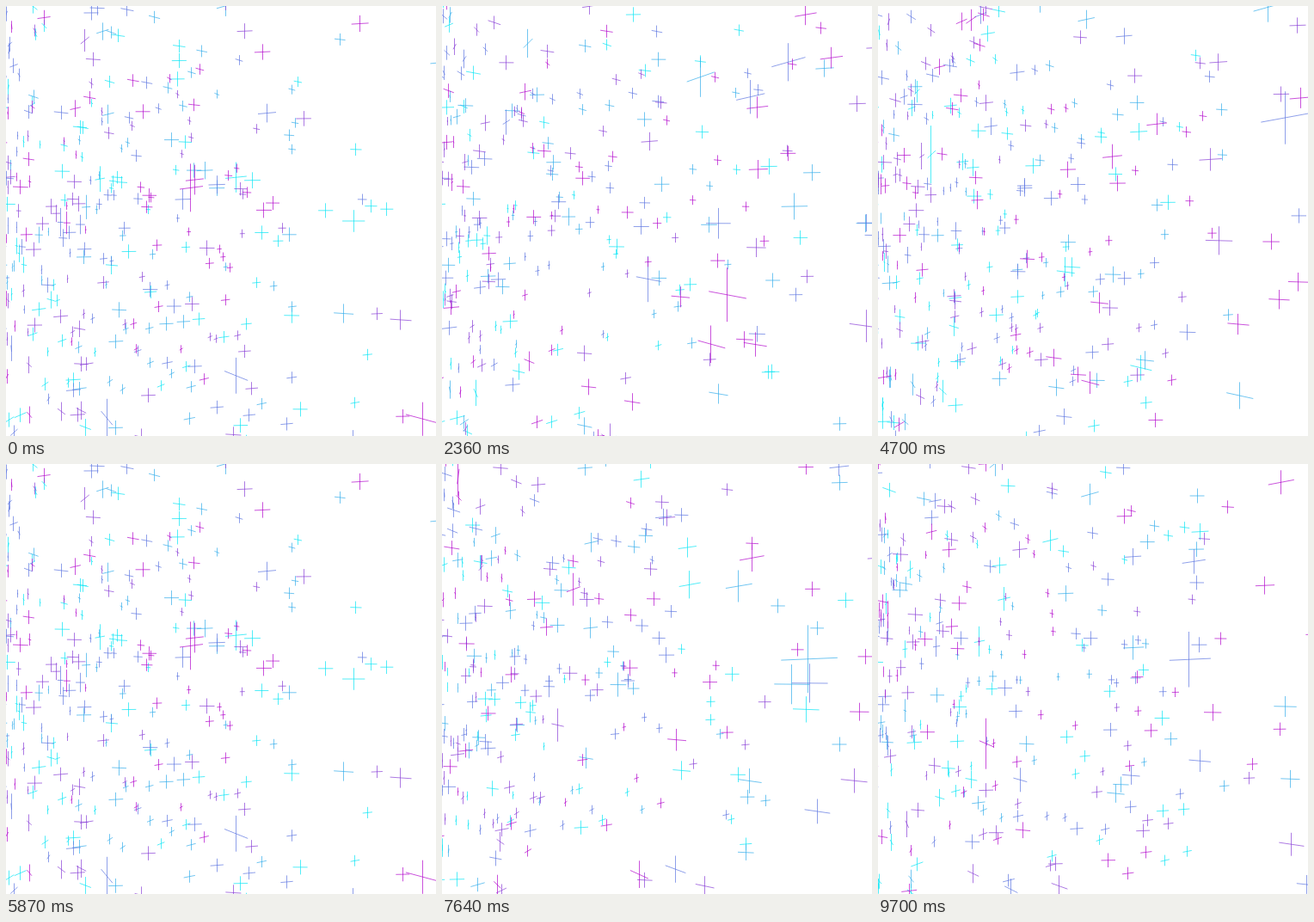
An HTML page that plays this animation: 500x500 px, repeating every 9800 ms.

```html
<!DOCTYPE html>
<html lang="en">
<head>
<meta charset="utf-8">
<title>Rotating crosses</title>
<style>
  html, body { margin: 0; width: 100%; height: 100%; overflow: hidden; background: #fff; }
  svg { display: block; width: 100vw; height: 100vh; }
  path { fill: none; stroke-width: .7; }
</style>
</head>
<body>
<svg id="stage" viewBox="0 0 500 500"></svg>
<script>
const LOOP = 9800, STEP = 146.8, STEP_LEAD = 9;
const TURN = Math.PI * 2 / 40;          // rotation per step
const DEPTH = 540, MID = 250;           // viewer distance, optical centre
const COUNT = 660, RADIUS = 500, HEIGHT = 570, HALF = 8.5;
const SHADES = 5, CYAN = [10, 229, 245], MAGENTA = [180, 10, 205];

let seed = 20417;
function random() {
  seed = (seed * 1664525 + 1013904223) >>> 0;
  return seed / 4294967296;
}

const cross = (r, turns, y, shade) => ({ r, angle: turns * TURN, y, shade });

// The crosses that pass closest to the viewer; the rest are scattered evenly.
const crosses = [
  cross(512, 18.2, -5, 1),
  cross(486, 32.1, -6, 2),
  cross(483, 12.3, -25, 4),
  cross(462, 12, 76, 1),
  cross(411, 5.7, 73, 2),
  cross(379, 29.2, 63, 2)
];
while (crosses.length < COUNT) {
  crosses.push(cross(
    random() * RADIUS,
    random() * 40,
    (random() - 0.5) * HEIGHT,
    Math.floor(random() * SHADES)
  ));
}

// The axis of rotation stands at the left edge of the stage.
function project(r, angle, y) {
  const scale = DEPTH / (DEPTH - r * Math.sin(angle));
  return [MID + (r * Math.cos(angle) - MID) * scale, MID + y * scale, scale];
}

const stage = document.getElementById('stage');
const paths = Array.from({ length: SHADES }, (_, i) => {
  const mix = CYAN.map((v, k) => Math.round(v + (MAGENTA[k] - v) * i / (SHADES - 1)));
  const path = document.createElementNS('http://www.w3.org/2000/svg', 'path');
  path.setAttribute('stroke', `rgb(${mix})`);
  stage.append(path);
  return path;
});

const num = v => v.toFixed(1);

function draw(step) {
  const lines = paths.map(() => '');
  for (const { r, angle, y, shade } of crosses) {
    const a = angle - step * TURN;
    const [x, cy, scale] = project(r, a, y);
    if (x < -60 || x > 560) continue;
    const [x1, y1] = project(r - HALF, a, y);
    const [x2, y2] = project(r + HALF, a, y);
    const column = Math.floor(x) + 0.5, arm = HALF * scale;
    lines[shade] += `M${num(x1)} ${num(y1)}L${num(x2)} ${num(y2)}` +
                    `M${column} ${num(cy - arm)}V${num(cy + arm)}`;
  }
  paths.forEach((path, i) => path.setAttribute('d', lines[i]));
}

const start = performance.now();
let shown = -1;
function tick() {
  const time = (performance.now() - start) % LOOP;
  const step = Math.floor((time + STEP_LEAD) / STEP);
  if (step !== shown) draw(shown = step);
  requestAnimationFrame(tick);
}
tick();
</script>
</body>
</html>
```
